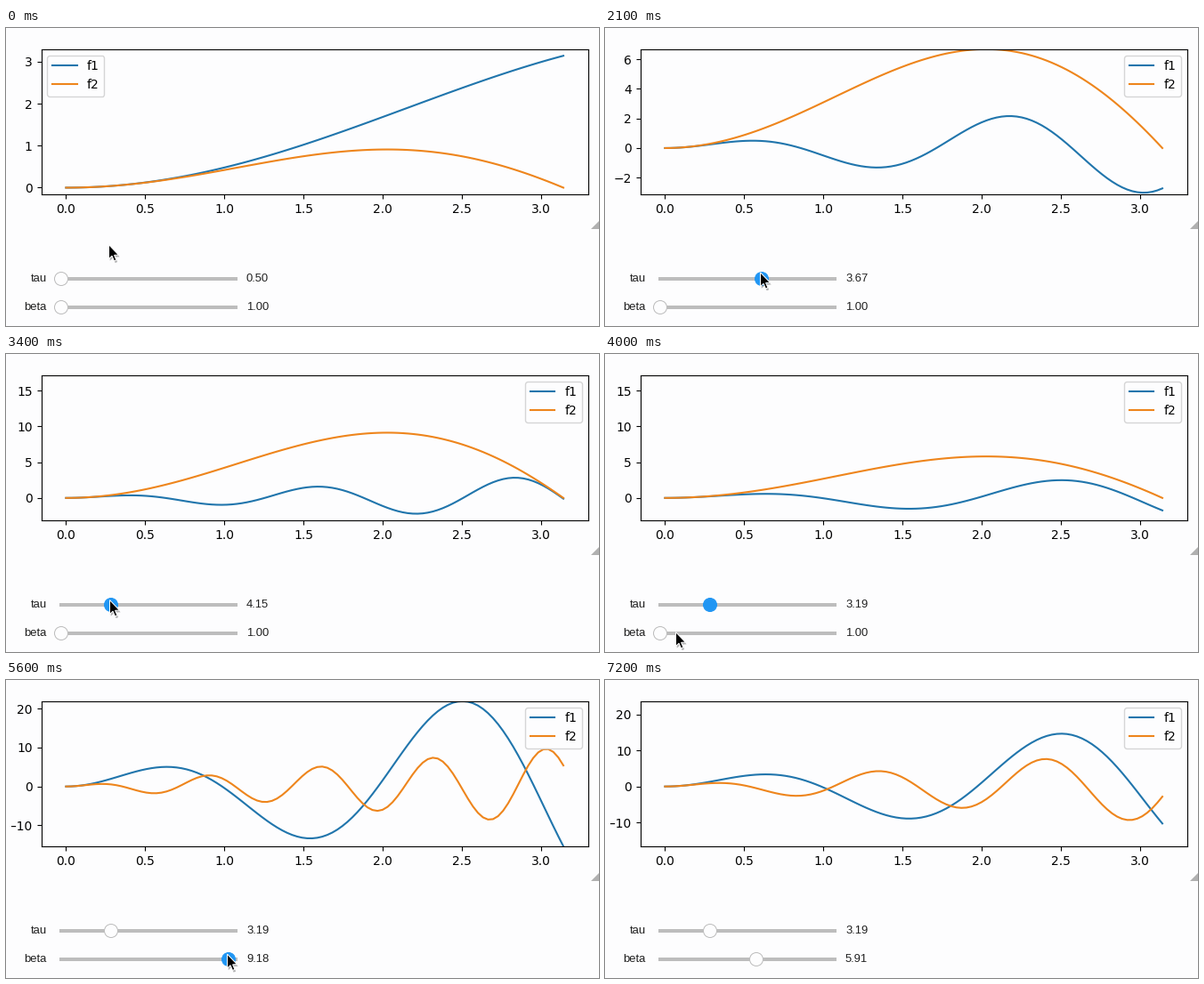
These frames come from a looping animation (666x335 px, 7300 ms). A matplotlib script:

```python
import numpy as np
import matplotlib.pyplot as plt
from matplotlib.animation import FuncAnimation
from matplotlib.patches import Circle, Polygon, Rectangle

W, H, DPI = 666, 335, 100
FRAMES, STEP = 73, 100
PX = 72 / DPI  # points per pixel
BACK, BLUE, GREY = "#fdfdfe", "#2196f3", "#bdbdbd"
frames = np.arange(FRAMES)

x = np.linspace(0, np.pi, 100)
taus = np.linspace(0.5, 10, 100)
betas = np.linspace(1, 10, 100)


def f1(tau, beta):
    return np.sin(x * tau) * x * beta


def f2(tau, beta):
    return np.sin(x * beta) * x * tau


def track(*keys):
    """Value for every frame, linear between (frame, value) keys."""
    return np.interp(frames, *zip(*keys))


def delay(values, n):
    return values[np.maximum(frames - n, 0)]


# Slider steps; the readout trails the handle by one frame, the plot by two.
tau_step = np.rint(track((14, 0), (16, 10), (19, 33), (20, 33), (21, 57),
                         (25, 93), (27, 89), (29, 76), (34, 28))).astype(int)
beta_step = np.rint(track((40, 0), (41, 20), (44, 20), (50, 64), (51, 74),
                          (56, 94), (58, 93), (60, 78), (61, 71), (62, 59),
                          (66, 54))).astype(int)

curves = [(f1(taus[i], betas[j]), f2(taus[i], betas[j]))
          for i, j in zip(delay(tau_step, 2), delay(beta_step, 2))]

# The y range only ever grows.
pad = 0.05 * np.pi
low = np.minimum.accumulate([min(-pad, np.min(c)) for c in curves])
high = np.maximum.accumulate([max(np.pi + pad, np.max(c)) for c in curves])


def knob_x(step):
    return 62 + 2 * step


# Pointer: free moves between a few points, x follows the handle in a drag.
path = [(1, 115, 243), (3, 64, 285), (7, 59, 273), (14, 61, 277),
        (29, 213, 271), (34, 116, 276), (37, 116, 276), (40, 79, 312),
        (44, 101, 315), (51, 207, 307), (60, 217, 308), (62, 189, 308),
        (66, 171, 308), (68, 108, 232), (69, 372, 57)]
tip_x = track(*[(n, px) for n, px, _ in path])
tip_y = track(*[(n, py) for n, _, py in path])
for first, last, step in ((14, 34, tau_step), (41, 60, beta_step)):
    drag = slice(first, last + 1)
    tip_x[drag] = knob_x(step[drag]) - 2

fig = plt.figure(figsize=(W / DPI, H / DPI), dpi=DPI, facecolor=BACK)

left, right, top, bottom = 39.52, 653.9, 23.8, 186.9
ax = fig.add_axes([left / W, 1 - bottom / H,
                   (right - left) / W, (bottom - top) / H], facecolor=BACK)
line1, = ax.plot(x, curves[0][0], color="#2075ac", label="f1")
line2, = ax.plot(x, curves[0][1], color="#ee851c", label="f2")
ax.set_xlim(-pad, np.pi + pad)
ax.legend(loc="best", facecolor=BACK)

# Pixel coordinates with y pointing down.
ui = fig.add_axes([0, 0, 1, 1], zorder=5)
ui.set_xlim(0, W)
ui.set_ylim(H, 0)
ui.axis("off")
ui.add_patch(Rectangle((0, 0), 6, 230, fc=BACK, lw=0))
ui.add_patch(Polygon([(657, 226), (666, 226), (666, 216.5)],
                     fc="#b0b0b0", lw=0))


def make_slider(name, y):
    font = dict(family="Liberation Sans", size=13 * PX, color="#212121")
    ui.text(46, y + 3, name, ha="right", va="baseline", **font)
    ui.add_patch(Rectangle((60, y - 2), 200, 4, fc=GREY, lw=0))
    knob = ui.add_patch(Circle((62, y), 7.5, lw=PX, zorder=2))
    value = ui.text(270, y + 3, "", va="baseline", **font)
    return knob, value


def set_slider(slider, step, value, active):
    knob, text = slider
    knob.center = (knob_x(step), knob.center[1])
    knob.set_facecolor(BLUE if active else BACK)
    knob.set_edgecolor(BLUE if active else GREY)
    text.set_text(f"{value:.2f}")


tau_slider = make_slider("tau", 282)
beta_slider = make_slider("beta", 314)
tau_value = taus[delay(tau_step, 1)]
beta_value = betas[delay(beta_step, 1)]

arrow = 1.06 * np.array([(0.5, 0.6), (0.5, 15.5), (3.8, 12.4), (6.1, 17.8),
                         (8.4, 16.8), (6.2, 11.6), (10.8, 11.4)])
shadow = ui.add_patch(Polygon(arrow, fc="black", alpha=0.3, lw=0, zorder=8))
pointer = ui.add_patch(Polygon(arrow, fc="black", ec="white", lw=PX, zorder=9))


def draw(n):
    line1.set_ydata(curves[n][0])
    line2.set_ydata(curves[n][1])
    ax.set_ylim(low[n], high[n])
    set_slider(tau_slider, tau_step[n], tau_value[n], 9 <= n <= 40)
    set_slider(beta_slider, beta_step[n], beta_value[n], 41 <= n <= 71)
    tip = np.array([tip_x[n], tip_y[n]])
    pointer.set_xy(arrow + tip)
    shadow.set_xy(arrow + tip + (1.2, 2.2))
    for p in (pointer, shadow):
        p.set_visible(n < 70)
    return line1, line2, pointer, shadow


anim = FuncAnimation(fig, draw, frames=FRAMES, interval=STEP,
                     repeat=True, repeat_delay=0, blit=False)
plt.show()
```
